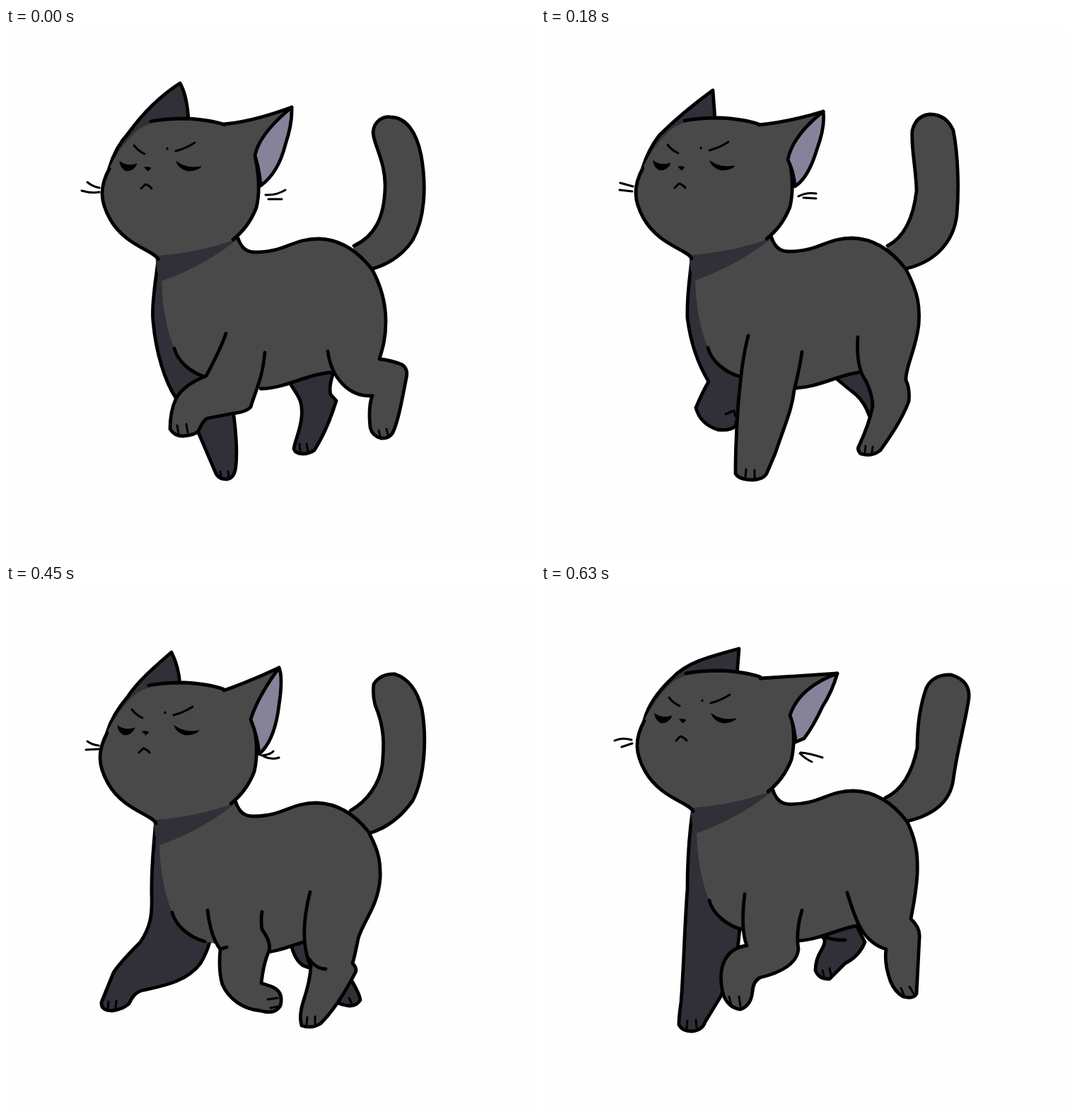
These frames come from a looping animation (748 px wide and 748 px high, 720 ms). An HTML page without scripts:

```html
<!DOCTYPE html>
<html lang="en">
<head>
<meta charset="utf-8">
<title>Walking cat</title>
<style>
html, body { margin: 0; width: 100%; height: 100%; overflow: hidden; background: #fefefe; }
svg { display: block; width: 100vw; height: 100vh; }
path { fill: none; stroke: #000; stroke-width: 4.8; stroke-linecap: round; stroke-linejoin: round; }
.fur { fill: #494949; }
.far { fill: #312f37; }
.inner { fill: #868299; }
.flat { stroke: none; }
.ink { fill: #000; stroke-width: 1; }
.thin { stroke-width: 3; }
.pose { opacity: 0; animation: show 720ms step-end infinite; animation-delay: calc((var(--n) - 8) * 90ms); }
@keyframes show { 0% { opacity: 1; } 12.5%, 100% { opacity: 0; } }
</style>
</head>
<body>
<svg viewBox="0 0 748 748">
<defs>
  <g id="torso">
    <path class="far flat" d="M210 314L326 294L331 316L224 362L214 345Z"/>
    <path class="fur flat" d="M220 358Q277 338 326 300Q333 318 352 317C395 317 405 298 442 298C480 299 505 325 518 342L485 470L462 487C430 489 400 510 360 510L284 494C262 488 243 472 238 453C226 425 221 390 220 358Z"/>
    <path d="M328 297Q334 317 352 317C395 317 405 298 442 298C480 299 505 325 518 342M238 453C243 472 262 488 284 494M360 510C395 510 425 489 461 487"/>
  </g>
  <g id="head">
    <path class="fur flat" d="M215 327C211 315 168 308 147 270C133 245 132 225 146 199C154 180 166 164 182 148C196 134 225 128 255 128Q290 130 310 137Q345 150 354 188Q361 225 354 254Q343 282 322 300Q270 318 214 322Z"/>
    <path d="M215 327C211 315 168 308 147 270C133 245 132 225 146 199M205 132C225 128 240 128 255 128Q290 130 310 137M353 186Q361 225 354 254Q343 282 321 299"/>
    <path class="ink" d="M161 189Q172 197 185 192Q181 202 170 202Q162 199 161 189ZM241 189Q256 200 276 196Q270 202 257 202Q244 199 241 189ZM196 197Q201 196 205 198L201 202Z"/>
    <path class="thin" d="M181 166Q187 174 196 178M240 174Q255 170 267 162M228 170V171M191 227L197 221Q202 222 206 227"/>
  </g>
</defs>

<g class="pose" style="--n:0">
  <path class="fur" d="M492 308C520 295 535 270 536 225C537 190 520 165 519 148C520 130 535 124 545 126C565 127 580 145 587 180C595 225 592 270 575 300Q555 330 517 341L485 335"/>
  <path class="far" d="M146 198C152 178 160 163 172 150C190 125 215 98 246 78Q256 95 258 130"/>
  <path class="far" d="M402 503C412 520 420 525 418 550C416 570 408 585 407 595C410 605 428 603 436 597C450 575 460 550 467 527L459 518Q456 508 463 487L440 470"/>
  <path class="far" d="M215 328C213 350 205 390 208 415C212 460 225 500 240 523L272 572L296 628Q300 638 312 638Q323 637 325 620Q328 590 321 540L290 480"/>
  <use href="#torso"/>
  <path class="fur" d="M518 342C532 368 537 390 537 415C537 440 532 455 528 468Q545 470 560 476Q569 482 566 495C560 525 555 555 547 572Q542 581 530 580Q518 577 515 565C513 545 514 530 518 520C485 522 460 495 455 457"/>
  <path class="fur" d="M311 432C303 455 292 475 283 492Q250 505 240 525Q232 542 232 567Q238 577 250 577Q266 576 272 570Q278 556 284 552L320 545Q340 543 346 536C352 515 363 495 366 459"/>
  <path class="thin" d="M242 562L244 573M255 560L257 572M527 569L529 577M538 567L540 575M303 627L304 635M314 627L315 636M415 588L416 598M425 588L427 598"/>
  <use href="#head"/>
  <path class="fur" d="M308 136Q350 132 404 112L353 186"/>
  <path class="inner" d="M404 112Q405 135 395 165Q385 205 360 223Q359 203 352 180Q358 150 404 112"/>
  <path class="thin" d="M115 218Q122 224 132 226M107 230Q120 234 132 232M367 236Q382 237 395 229M371 242H390"/>
</g>

<g class="pose" style="--n:1">
  <path class="fur" d="M488 318C514 304 530 275 532 238C534 195 518 170 521 148Q530 124 550 126C575 130 586 160 589 190C593 235 590 280 577 308Q550 342 514 351L482 345"/>
  <path class="far" d="M143 208C149 188 158 172 170 158C188 135 210 108 240 85Q250 108 252 140"/>
  <path class="far" d="M410 510Q425 530 428 550Q424 570 424 580Q430 590 446 585Q462 560 470 530L460 490"/>
  <path class="far" d="M211 341C209 365 203 400 206 430C212 475 230 510 258 540C268 575 285 600 315 605Q335 608 338 595Q338 580 322 572L325 530L290 490"/>
  <use href="#torso" x="-3" y="10"/>
  <path class="fur" d="M514 352C533 378 536 400 534 425C530 460 520 480 522 495Q545 505 543 520C535 550 525 570 512 590Q500 600 486 594Q480 588 485 575Q492 550 490 535C465 525 448 490 450 450"/>
  <path class="fur" d="M303 446C296 470 288 490 280 507Q256 535 248 560L237 596Q240 608 258 607Q272 605 279 590Q290 572 312 567Q340 558 354 528Q365 500 367 468"/>
  <path class="thin" d="M249 594L248 604M261 594L260 604M495 585L494 593"/>
  <use href="#head" x="-3" y="10"/>
  <path class="fur" d="M306 147Q340 135 395 116L349 195"/>
  <path class="inner" d="M395 116Q398 140 388 175Q378 220 358 232Q357 212 348 188Q356 158 395 116"/>
  <path class="thin" d="M114 221L131 228M111 233H130M364 241Q376 240 388 235M367 246H386"/>
</g>

<g class="pose" style="--n:2">
  <path class="fur" d="M490 308C515 295 527 265 531 230C530 195 523 170 525 145Q530 124 550 122Q573 122 583 145C590 180 591 230 588 264C584 300 560 330 517 340L485 335"/>
  <path class="far" d="M144 197C150 178 157 165 167 152C183 136 210 112 243 88L246 128"/>
  <path class="far" d="M418 496Q432 508 445 518Q458 530 464 548L475 530L460 485"/>
  <path class="far" d="M213 327C211 350 206 375 207 410C212 450 225 480 237 500Q228 515 219 537Q225 560 250 568Q268 570 275 563L290 500"/>
  <use href="#torso" x="-2" y="-1"/>
  <path class="fur" d="M516 341C534 375 536 395 534 420C530 455 515 480 516 498Q522 510 520 528C510 555 492 580 480 597Q468 607 452 602Q446 596 450 590Q464 560 469 535Q469 520 460 500Q445 480 448 437"/>
  <path class="fur" d="M293 435C285 465 283 490 279 530C276 570 275 600 275 630Q280 639 300 639Q315 638 319 630L331 602C345 560 355 540 358 512Q366 480 369 458"/>
  <path class="thin" d="M290 624L289 635M302 625V636M459 591L458 600M469 592L468 600M261 546L273 541L275 549"/>
  <use href="#head" x="-2" y="-1"/>
  <path class="fur" d="M308 137Q350 133 399 118L351 186"/>
  <path class="inner" d="M399 118Q402 140 390 172Q378 212 359 224Q358 205 349 186Q356 152 399 118"/>
  <path class="thin" d="M112 219L130 224M111 229L129 231M364 238Q375 232 389 234M371 240L389 241"/>
</g>

<g class="pose" style="--n:3">
  <path class="fur" d="M487 301C512 290 525 265 530 245C535 210 531 190 538 150Q545 125 568 122Q592 122 600 155Q600 175 592 195C590 230 590 265 575 295Q550 325 517 333L485 328"/>
  <path class="far" d="M146 191C152 170 165 152 182 135C200 118 225 105 257 90Q261 100 262 124"/>
  <path class="far" d="M420 486L434 497L442 486M497 490Q508 478 512 490C515 520 530 545 540 560Q535 570 522 568Q508 563 493 546L485 510"/>
  <path class="far" d="M214 322C212 345 204 385 210 410C214 445 220 475 224 490Q210 505 192 518Q180 530 186 548Q200 575 220 582Q235 584 238 572Q238 560 233 550Q250 535 275 525Q290 520 296 503L280 470"/>
  <use href="#torso" y="-7"/>
  <path class="fur" d="M518 335C530 360 532 370 531 395C528 440 508 470 501 490Q492 520 494 540C488 570 475 590 460 604Q445 613 427 608Q422 600 428 585C437 550 436 520 438 480Q440 430 445 412"/>
  <path class="fur" d="M290 430C293 470 296 510 306 560Q314 600 319 622Q325 629 340 627Q352 622 362 590C370 560 374 530 372 505Q365 495 366 473"/>
  <path class="thin" d="M327 617L329 626M340 617L342 625M430 600L431 607M440 600L441 607M216 570L220 580M226 567L229 578M520 558L526 565"/>
  <use href="#head" y="-7"/>
  <path class="fur" d="M310 131Q350 130 412 127L352 181"/>
  <path class="inner" d="M412 127Q408 150 395 172Q380 203 360 216Q359 198 350 181Q365 147 412 127"/>
  <path class="thin" d="M109 224Q118 220 129 224M114 232L129 228M364 233L385 235M366 238Q373 244 383 246"/>
</g>

<g class="pose" style="--n:4">
  <path class="fur" d="M490 309C515 297 528 270 533 240C536 210 525 180 528 150Q538 123 560 124Q585 130 592 165C596 210 590 260 576 300Q552 334 517 342L485 335"/>
  <path class="far" d="M146 198C152 178 165 158 180 142C198 122 218 105 247 92Q254 108 254 130"/>
  <path class="far" d="M410 498L428 512L442 488M496 520Q510 545 522 572Q525 584 512 585Q495 583 480 566"/>
  <path class="far" d="M215 328C212 350 205 390 208 430Q213 470 212 490Q185 512 160 535Q148 550 152 570Q160 590 180 592Q198 590 198 572Q225 555 260 545Q285 530 293 502L280 475"/>
  <use href="#torso"/>
  <path class="fur" d="M518 342C532 370 534 390 532 405C527 450 505 475 499 500Q492 530 493 545C485 575 470 600 452 616Q435 624 420 617Q417 605 425 588Q434 550 432 520Q432 460 438 425"/>
  <path class="fur" d="M288 440C292 480 300 520 313 560Q328 600 338 625Q345 634 361 632Q374 628 374 605Q380 560 374 512Q364 495 366 468"/>
  <path class="thin" d="M348 621L350 631M361 620L363 630M427 607V616M438 607V616M170 578L172 588M182 577L184 587"/>
  <use href="#head"/>
  <path class="fur" d="M309 138Q350 131 400 121L353 186"/>
  <path class="inner" d="M400 121Q401 145 390 175Q378 212 360 226Q358 205 350 186Q358 150 400 121"/>
  <path class="thin" d="M112 222L130 226M113 232L130 230M363 237L383 235M366 241L384 245"/>
</g>

<g class="pose" style="--n:5">
  <path class="fur" d="M487 319C512 305 528 280 532 255C535 225 535 200 522 170Q518 155 520 140Q530 125 550 126Q578 135 588 175C595 215 593 270 575 305Q550 340 514 351L482 345"/>
  <path class="far" d="M143 208C149 188 160 172 172 158C185 138 205 120 234 95Q244 115 246 140"/>
  <path class="far" d="M403 508Q408 530 420 538Q430 543 440 540L430 505M488 558Q500 578 501 587Q495 596 485 595Q475 594 468 590"/>
  <path class="far" d="M211 341C209 370 205 400 206 440C207 470 203 485 190 505Q160 535 152 548L135 590Q134 602 150 602Q165 600 174 592Q180 578 190 574C220 567 255 562 275 535Q284 520 288 505L250 470"/>
  <use href="#torso" x="-3" y="10"/>
  <path class="fur" d="M514 352C528 378 530 395 529 415C526 455 505 475 498 500Q493 525 490 535Q497 542 494 548C480 575 465 600 445 620Q432 628 418 623Q414 610 420 590Q430 560 431 540C420 515 418 480 430 434"/>
  <path class="fur" d="M285 460C288 485 295 505 303 515Q300 545 306 565C315 585 335 600 360 602Q380 608 388 595Q393 575 376 568L361 563Q364 535 372 517Q375 505 362 487Q360 475 362 462"/>
  <path d="M428 528Q438 543 452 543M303 515L312 512"/>
  <path class="thin" d="M145 589L144 599M156 588L155 598M426 611L425 621M437 610V620M370 586L384 584M374 598L385 596M485 584L489 592"/>
  <use href="#head" x="-3" y="10"/>
  <path class="fur" d="M308 149Q340 138 386 117L348 196"/>
  <path class="inner" d="M386 117Q392 130 386 170Q380 220 358 239Q356 215 346 190Q356 158 386 117"/>
  <path class="thin" d="M115 221Q122 226 131 227M113 233L131 232M361 241Q374 240 378 235M364 242Q375 248 386 244"/>
</g>

<g class="pose" style="--n:6">
  <path class="fur" d="M492 310C515 298 528 275 534 240C534 200 528 175 531 145Q540 125 565 125Q590 128 592 145C594 190 592 250 578 300Q560 330 518 343L485 337"/>
  <path class="far" d="M146 200C150 178 165 155 182 138C200 118 225 102 260 87Q268 105 268 132"/>
  <path class="far" d="M410 502Q422 515 438 518Q438 545 445 553Q455 562 462 560L465 510L440 490"/>
  <path class="far" d="M214 330C210 360 210 400 209 430C200 470 193 500 185 530Q168 580 159 618Q160 632 182 633Q200 632 208 618C225 590 250 560 268 532Q275 515 277 493L250 460"/>
  <use href="#torso" y="2"/>
  <path class="fur" d="M518 344C533 370 534 390 532 405C527 445 505 465 501 510Q513 518 513 535C508 565 490 590 477 605Q465 613 453 606Q450 600 458 588Q463 565 460 540C450 505 425 480 430 428"/>
  <path class="fur" d="M286 450C286 485 290 500 300 514Q283 530 277 562Q280 590 315 595Q345 593 350 577Q350 567 340 565L323 570Q355 550 364 540Q373 520 377 512Q364 490 374 470"/>
  <path d="M300 514Q315 505 344 504M322 570Q332 567 336 573M340 576H344"/>
  <path class="thin" d="M172 619L173 630M187 618L189 630M462 597L461 605M471 597L470 605"/>
  <use href="#head" y="2"/>
  <path class="fur" d="M310 140Q355 138 404 125L353 190"/>
  <path class="inner" d="M404 125Q406 145 398 185Q385 215 360 231Q359 210 352 189Q362 153 404 125"/>
  <path class="thin" d="M117 216Q122 222 131 223M113 229L131 231M364 239Q376 238 384 234M367 245H384"/>
</g>

<g class="pose" style="--n:7">
  <path class="fur" d="M487 301C510 290 525 265 532 230C532 195 536 170 545 145Q555 126 580 127Q607 135 605 160C600 195 588 235 583 275Q577 320 518 334L485 328"/>
  <path class="far" d="M146 191C152 168 168 148 185 132C205 110 235 102 280 90L277 128"/>
  <path class="far" d="M398 498Q405 502 396 517Q388 530 388 545Q393 558 408 557Q420 545 430 535Q450 525 458 505L440 470M400 497Q415 503 430 502"/>
  <path class="far" d="M214 322C210 350 207 390 207 430C203 480 202 540 198 590Q195 610 195 622Q200 631 213 631Q228 630 232 618L254 582L278 515L281 486"/>
  <use href="#torso" y="-7"/>
  <path class="fur" d="M518 335C532 365 533 385 532 410C530 440 525 460 523 472Q537 485 535 500L531 578Q527 586 512 582Q500 575 494 560Q485 535 488 515C455 505 445 475 433 435"/>
  <path class="fur" d="M288 437C284 470 285 495 291 510Q270 512 260 530Q250 550 258 580Q265 598 282 600Q297 595 299 575Q300 560 310 555C340 548 362 535 364 515Q360 490 369 460"/>
  <path class="thin" d="M266 582L269 594M280 582L282 596M509 570L513 579M521 568L527 578M207 616L206 627M219 615L220 626M398 545L400 553M408 542L410 551"/>
  <use href="#head" y="-7"/>
  <path class="fur" d="M310 132Q355 129 419 125L352 184"/>
  <path class="inner" d="M419 125Q412 150 398 172Q385 200 372 217L360 222Q359 203 352 184Q365 145 419 125"/>
  <path class="thin" d="M104 220Q115 215 128 219M114 229L129 224M367 237Q380 238 398 244M366 238Q374 246 383 250"/>
</g>
</svg>
</body>
</html>
```
